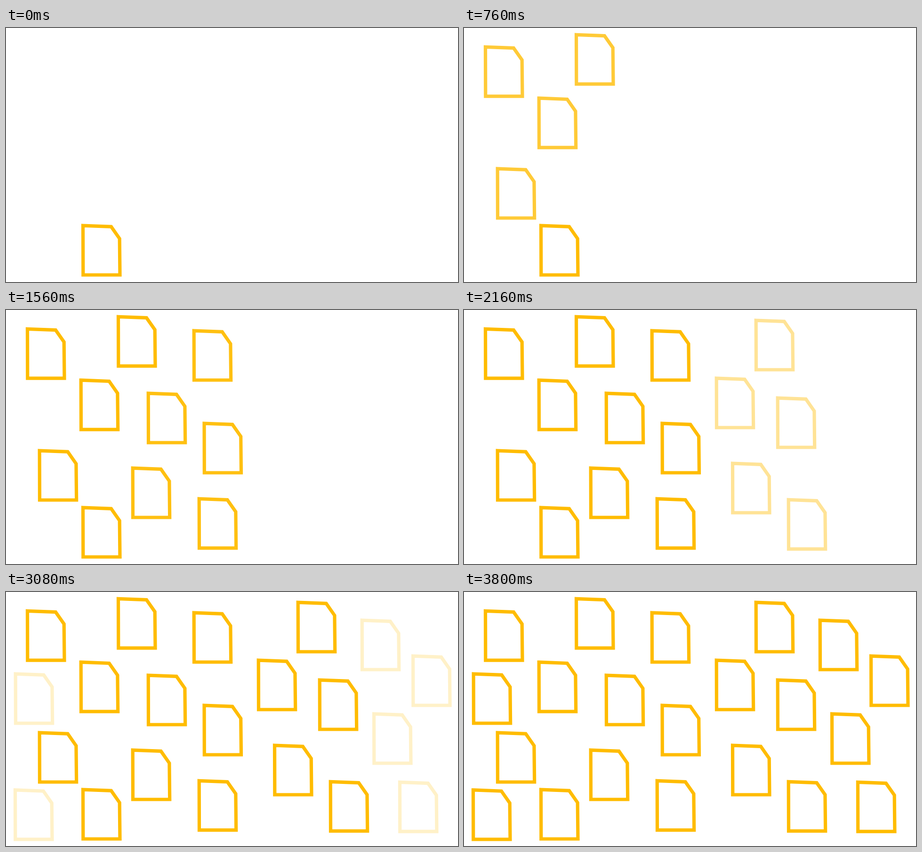
An HTML page that plays this animation: 960 by 540 pixels, repeating every 3.84 s.

```html
<!DOCTYPE html>
<html lang="en">
<head>
<meta charset="utf-8">
<title>Pages</title>
<style>
  html, body { margin: 0; width: 100%; height: 100%; overflow: hidden; background: #fff; }
  svg { display: block; width: 960px; height: 540px; }
  #page { fill: none; stroke: #ffbc00; stroke-width: 7.2; stroke-linejoin: miter; }
  .wave { opacity: 0; animation: 3840ms linear infinite; }
  .w1 { animation-name: w1; }
  .w2 { animation-name: w2; }
  .w3 { animation-name: w3; }
  .w4 { animation-name: w4; }
  @keyframes w1 { 0% { opacity: 0; } 25.26%, 100% { opacity: 1; } }
  @keyframes w2 { 0%, 25.52% { opacity: 0; } 41.67%, 100% { opacity: 1; } }
  @keyframes w3 { 0%, 43.75% { opacity: 0; } 73.96%, 100% { opacity: 1; } }
  @keyframes w4 { 0%, 75% { opacity: 0; } 98.96%, 100% { opacity: 1; } }
</style>
</head>
<body>
<svg viewBox="0 0 960 540">
  <defs>
    <path id="page" d="M3.5 3.6L63.4 5.9L81.2 31.3L82 108.5H3.8Z"/>
  </defs>
  <use href="#page" x="160" y="416.5"/>
  <g class="wave w1">
    <use href="#page" x="42" y="36.7"/>
    <use href="#page" x="235" y="10.7"/>
    <use href="#page" x="155.7" y="145.6"/>
    <use href="#page" x="67.7" y="295.5"/>
  </g>
  <g class="wave w2">
    <use href="#page" x="395.7" y="40.5"/>
    <use href="#page" x="298.7" y="173.5"/>
    <use href="#page" x="417.5" y="237.5"/>
    <use href="#page" x="265.7" y="332.5"/>
    <use href="#page" x="406.7" y="397.7"/>
  </g>
  <g class="wave w3">
    <use href="#page" x="616.7" y="18.5"/>
    <use href="#page" x="532.7" y="141.5"/>
    <use href="#page" x="662.7" y="183.5"/>
    <use href="#page" x="567" y="322.5"/>
    <use href="#page" x="685.7" y="399.7"/>
  </g>
  <g class="wave w4">
    <use href="#page" x="752.7" y="56.5"/>
    <use href="#page" x="861" y="132.5"/>
    <use href="#page" x="16.7" y="170.5"/>
    <use href="#page" x="778" y="255.5"/>
    <use href="#page" x="16" y="417.3"/>
    <use href="#page" x="832.9" y="400.7"/>
  </g>
</svg>
</body>
</html>
```
